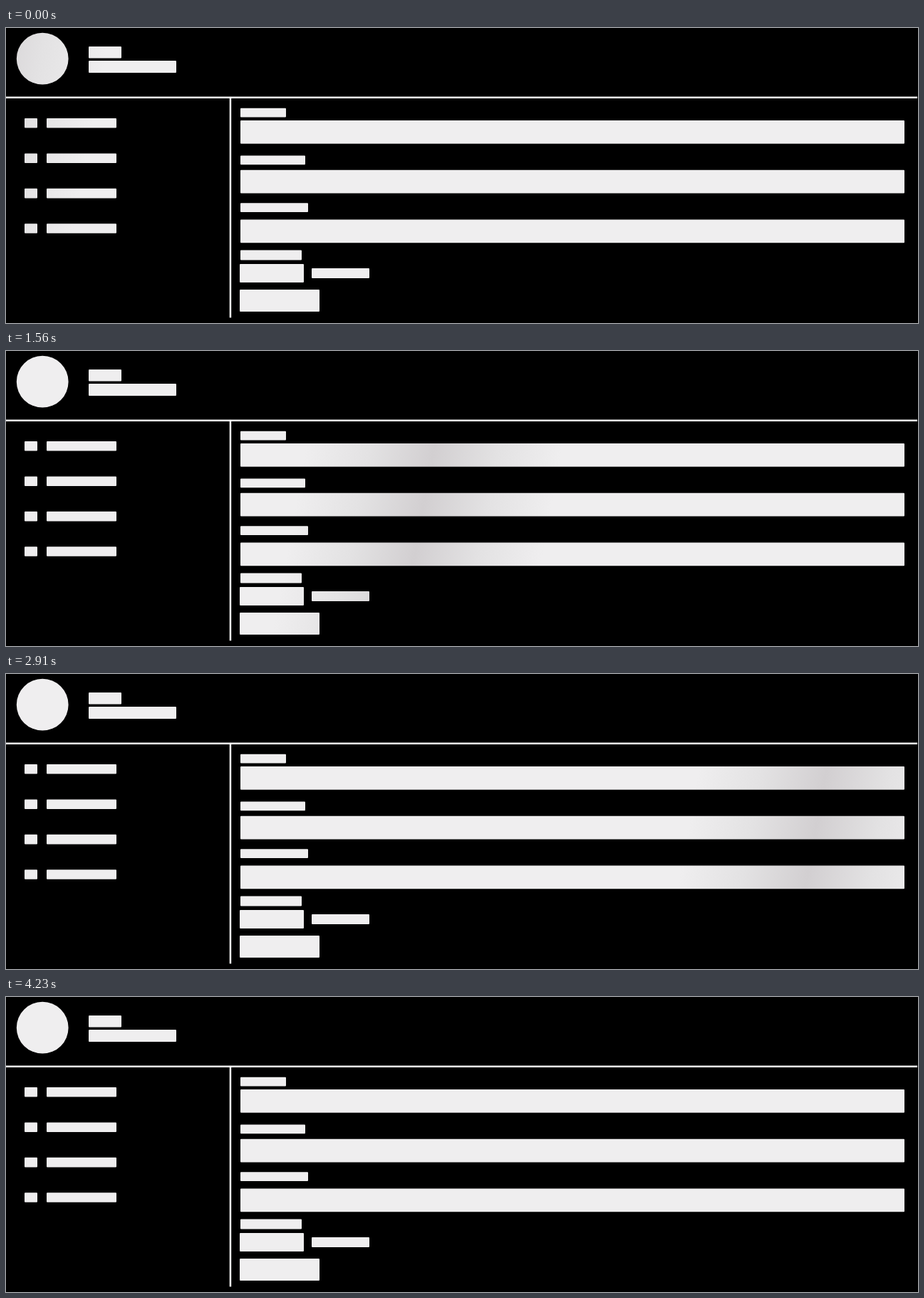
An HTML page with a canvas that plays this animation: 1280x415 px, repeating every 4.26 s.

```html
<!DOCTYPE html>
<html lang="en">
<head>
<meta charset="utf-8">
<title>Loading skeleton</title>
<style>
  html, body { margin: 0; width: 100%; height: 100%; overflow: hidden; background: #000; }
  canvas { display: block; width: 1280px; height: 415px; }
</style>
</head>
<body>
<canvas id="stage" width="1280" height="415"></canvas>
<script>
const ctx = document.getElementById('stage').getContext('2d');

const LOOP = 4260;
const STEP = 30;
const SWEEP = 1050;
const REST = 120;              // the loop opens and closes on a still picture
const FROM = -60, TO = 1320;   // centre of the shimmer at y = AXIS
const HALF = 180;
const TILT = 0.18;
const AXIS = 146;
const BASE = '#efeeef', MIDDLE = '#e3e2e3', SHADE = '#d2cfd1';

const skeleton = new Path2D();
const bar = (x, y, width, height) => skeleton.roundRect(x, y, width, height, 1);

function addHeader() {
  skeleton.arc(51.2, 43.2, 36.4, 0, Math.PI * 2);
  bar(116, 26, 46, 16.5);
  bar(116, 46, 123, 17);
}

function addMenu() {
  for (let row = 0; row < 4; row++) {
    const y = 127 + 49.4 * row;
    bar(26, y, 18, 13.6);
    bar(57, y, 98, 13.6);
  }
}

function addForm() {
  [64, 91, 95].forEach((labelWidth, row) => {
    bar(329, 112.7 + 66.8 * row, labelWidth, 12.7);
    bar(329, 130 + 69.75 * row, 932, 32.8);
  });
  bar(329, 312.5, 86, 14);
  bar(328, 332, 90, 26);
  bar(429, 338, 81, 14);
  bar(328, 368, 112, 31);
}

function shimmerCentre(time) {
  let t = Math.floor(time / STEP) * STEP;
  if (t < REST) t = 0;
  const phase = (Math.min(t, 4 * SWEEP - REST) % SWEEP) / SWEEP;
  return FROM + (TO - FROM) * (1 - Math.cos(Math.PI * phase)) / 2;
}

function shimmerFill(time) {
  if (time >= LOOP - STEP) return BASE;
  const centre = shimmerCentre(time);
  const dx = HALF / (1 + TILT * TILT), dy = dx * TILT;
  const fill = ctx.createLinearGradient(centre - dx, AXIS - dy, centre + dx, AXIS + dy);
  [BASE, MIDDLE, SHADE, MIDDLE, BASE].forEach((color, i) => fill.addColorStop(i / 4, color));
  return fill;
}

function draw(time) {
  ctx.fillStyle = '#000';
  ctx.fillRect(0, 0, 1280, 415);
  ctx.fillStyle = '#fafafa';
  ctx.fillRect(0, 96.5, 1279, 2.5);
  ctx.fillRect(313.7, 98, 2.5, 309.5);
  ctx.fillStyle = shimmerFill(time);
  ctx.fill(skeleton);
}

addHeader();
addMenu();
addForm();

const start = performance.now();
function tick() {
  draw((performance.now() - start) % LOOP);
  requestAnimationFrame(tick);
}
tick();
</script>
</body>
</html>
```
